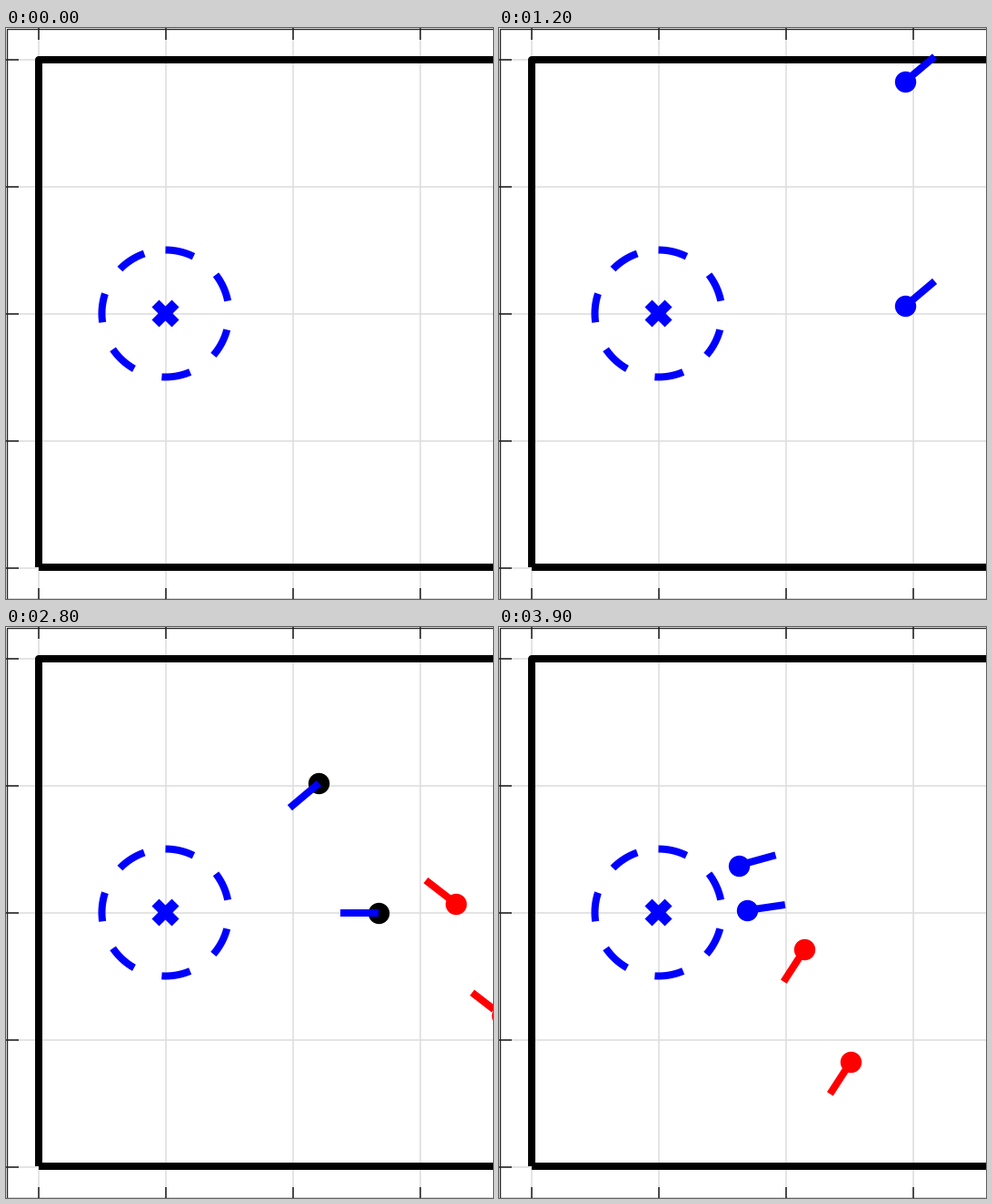
Animation of 536x629 px, one loop 4000 ms. Source, as a matplotlib script:

```python
import numpy as np
import matplotlib.pyplot as plt
from matplotlib.animation import FuncAnimation

W, H, DPI = 536, 629, 64
PT = 72 / DPI            # points per pixel
UNIT = 140               # pixels per grid cell
SPEED = 17.5             # pixels per frame
LAG = 0.18               # start delay, in frames
BASE = np.array([175.5, 314.5])
BLUE, RED, BLACK = (0, 0, 1), (1, 0, 0), (0, 0, 0)
INK = (0.15, 0.15, 0.15)

fig = plt.figure(figsize=(W / DPI, H / DPI), dpi=DPI, facecolor="white")
ax = fig.add_axes([0, 0, 1, 1])
ax.set_xlim(0, W)
ax.set_ylim(H, 0)
ax.axis("off")


def line(xs, ys, color, width, z, **kw):
    kw.setdefault("solid_capstyle", "butt")
    return ax.plot(xs, ys, color=color, lw=width * PT, zorder=z, **kw)[0]


# Grid, ticks and frame
for x in 35.5 + UNIT * np.arange(4):
    line([x, x], [0, H], (0.87, 0.87, 0.87), 1.6, 1)
    line([x, x], [0, 12.5], INK, 1.6, 2)
    line([x, x], [H - 12.5, H], INK, 1.6, 2)
for y in 34.5 + UNIT * np.arange(5):
    line([0, W], [y, y], (0.87, 0.87, 0.87), 1.6, 1)
    line([0, 13.5], [y, y], INK, 1.6, 2)
line([W + 20, 0.5, 0.5, W + 20], [0.5, 0.5, H - 0.5, H - 0.5], INK, 1.4, 2)

# Field wall
line([35.8, W + 20], [594.3, 594.3], BLACK, 8, 3)
line([W + 20, 35.8, 35.8], [34.8, 34.8, 594.3], BLACK, 8, 3,
     solid_joinstyle="round")

# Base: dashed ring drawn clockwise from the top, with a cross inside
a = np.linspace(0, 2 * np.pi, 361)
line(BASE[0] + 70 * np.sin(a), BASE[1] - 70 * np.cos(a), BLUE, 8, 4,
     linestyle=(0, (4, 4)), dash_capstyle="butt")
for s in (1, -1):
    line(BASE[0] + np.array([-11, 11]), BASE[1] + s * np.array([-11, 11]),
         BLUE, 11.3, 4)

# Weaving path: the heading swings as sin(0.2 t), in radians
T = np.linspace(0, 40, 4001)
SWING = np.sin(0.2 * T)


def integral(f):
    steps = (f[1:] + f[:-1]) / 2 * (T[1] - T[0])
    return np.concatenate([[0], np.cumsum(steps)])


PATH_X = SPEED * integral(np.cos(SWING))
PATH_Y = -SPEED * integral(np.sin(SWING))


def weave(t):
    return np.array([np.interp(t, T, PATH_X), np.interp(t, T, PATH_Y)])


def heading(angle):
    return np.array([np.cos(angle), -np.sin(angle)])


def leave_base(end, angle, rate, back):
    """Pose a few frames before `end`, with a slowly rising heading."""
    mid = heading(angle - rate * back / 2)
    return end - SPEED * back * mid, angle - rate * back


def weaver(start, n):
    t = n - LAG
    return start + weave(t), np.sin(0.2 * t), BLUE


def upper(n):
    if n < 16:
        return weaver(BASE + 175 * heading(np.pi / 4), n)
    if n < 37:
        spot = np.array([398, 127])
        to_base = (BASE - spot) / np.hypot(*(BASE - spot))
        angle = np.arctan2(-to_base[1], to_base[0])
        return spot + SPEED * (n - 24) * to_base, angle, BLACK
    return *leave_base(np.array([264, 262.5]), 0.27, 0.073, 39 - n), BLUE


def middle(n):
    if n < 16:
        return BASE + [175 + SPEED * (n - LAG), 0], 0, BLUE
    if n < 38:
        return np.array([287.5 + SPEED * (35 - n), BASE[1]]), np.pi, BLACK
    return *leave_base(np.array([273.3, 312]), 0.144, 0.068, 39 - n), BLUE


def lower(n):
    return weaver(BASE + 175 * heading(-np.pi / 4), n)


def rival(n, offset):
    t = n - LAG
    pos = np.array([447.5, 284.5]) + offset - (weave(t) - weave(31 - LAG))
    return pos, np.pi + np.sin(0.2 * t), RED


def rival_front(n):
    return rival(n, np.zeros(2))


def rival_back(n):
    return rival(n, np.array([51, 123.7]))


class Agent:
    def __init__(self, pose, color):
        self.pose = pose
        self.dot = ax.plot([], [], "o", ms=23.4 * PT, mew=0, zorder=5)[0]
        self.arm = line([], [], color, 8, 6)

    def draw(self, n):
        pos, angle, color = self.pose(n)
        tip = pos + 42 * heading(angle)
        self.dot.set_data([pos[0]], [pos[1]])
        self.dot.set_color(color)
        self.arm.set_data([pos[0], tip[0]], [pos[1], tip[1]])
        for part in (self.dot, self.arm):
            part.set_visible(n > 0)


agents = [Agent(p, BLUE) for p in (upper, middle, lower)]
agents += [Agent(p, RED) for p in (rival_front, rival_back)]


def update(n):
    for agent in agents:
        agent.draw(n)
    return [part for g in agents for part in (g.dot, g.arm)]


anim = FuncAnimation(fig, update, frames=40, interval=100, repeat=True,
                     repeat_delay=0, blit=False)
plt.show()
```
